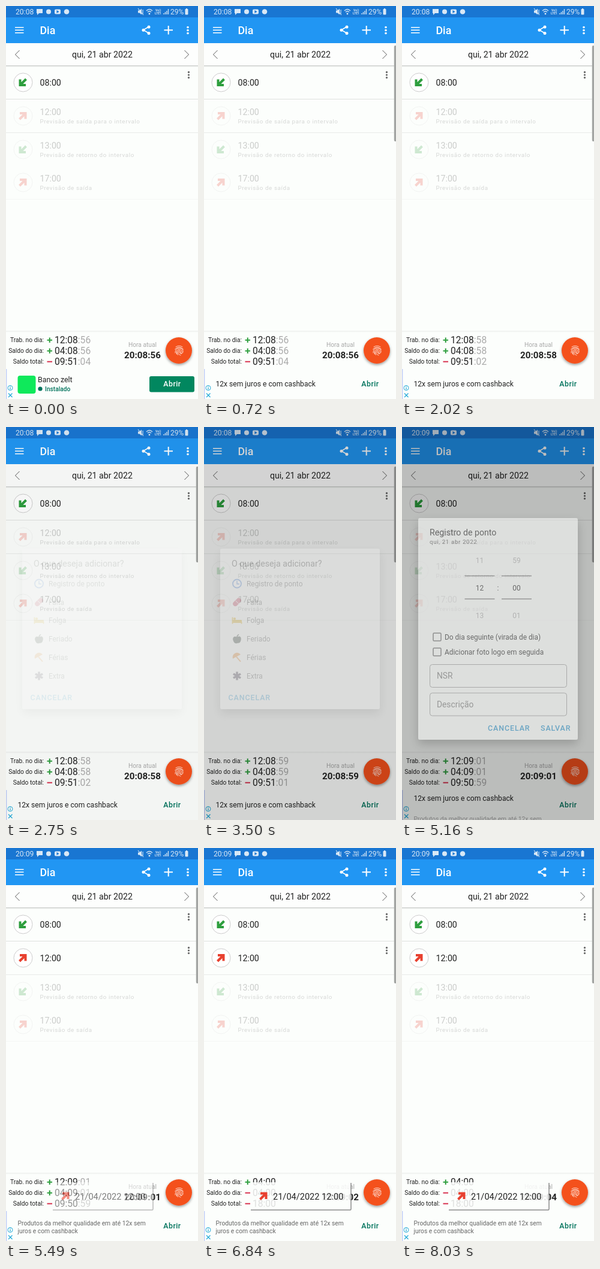
Write an HTML page that moves like this. It is 320 px wide and 656 px high and loops after 8.78 s.

```html
<!DOCTYPE html>
<html lang="pt">
<head>
<meta charset="utf-8">
<style>
html, body { margin: 0; height: 100%; overflow: hidden; background: #fcfefc; }
svg { display: block; width: 320px; height: 656px; font-family: Roboto, sans-serif; fill: #222; }
text { white-space: pre; }
</style>
</head>
<body>
<svg id="stage" viewBox="0 0 320 656"></svg>
<script>
const LOOP = 8780;
const STEPS = [0, 100, 200, 310, 410, 510, 610, 720, 820, 1040, 2020, 2650, 2760, 2870, 2970,
  3500, 3600, 3670, 3730, 4030, 5030, 5160, 5260, 5380, 5490, 5610, 5680, 5750, 5810, 6040,
  6840, 6920, 7000, 7070, 7900, 8030];
const TICKS = [1040, 2020, 2970, 3730, 4030, 6040, 7070, 8030];
const GREEN = '#2e9e3e', RED = '#e8402f', TEAL = '#01735c', BLUE = '#2196f3', LINK = '#2491cb';

// y is the middle of the capitals
const text = (x, y, size, str, attrs = '') =>
  `<text x="${x}" y="${(y + size * .355).toFixed(2)}" font-size="${size}" ${attrs}>${str}</text>`;
const rect = (x, y, w, h, fill, attrs = '') =>
  `<rect x="${x}" y="${y}" width="${w}" height="${h}" fill="${fill}" ${attrs}/>`;
const dot = (x, y, r, fill, attrs = '') => `<circle cx="${x}" cy="${y}" r="${r}" fill="${fill}" ${attrs}/>`;
const line = (d, stroke, w = 1, attrs = '') =>
  `<path d="${d}" fill="none" stroke="${stroke}" stroke-width="${w}" ${attrs}/>`;
const group = (id, body, attrs = '') => `<g id="${id}" ${attrs}>${body}</g>`;
const kebab = (x, y, gap, r, fill) => [-gap, 0, gap].map(d => dot(x, y + d, r, fill)).join('');
const arrow = (x, y, out) =>
  line('M-5-4.500H4.500V5M4-4L-5.500 5.500', out ? RED : GREEN, 4, `transform="translate(${x} ${y}) rotate(${out ? 0 : 180})"`);
const caption = 'letter-spacing=".6" fill="#555"', button = `fill="${LINK}" font-weight="500" letter-spacing=".9"`;

const statusBar = rect(0, 0, 320, 19, '#1976d2') + `<g fill="#d9e8f6">` +
  text(16, 9.5, 12.2, '20:08', 'id="status"') +
  '<path d="M51 5h10v7h-6l-3 3v-3h-1z"/>' + dot(71, 9.5, 4, '#d9e8f6') +
  rect(81, 5.5, 10, 8, '#d9e8f6', 'rx="2"') + '<path d="M84.5 7l4 2.5-4 2.5z" fill="#1976d2"/>' +
  dot(101, 9.5, 4.3, '#d9e8f6') +
  '<path d="M220 7.5h2.5l3.5-3v10l-3.5-3H220z"/>' + line('M220 4l9 11M228 6v7', '#d9e8f6', 1.1) +
  line('M234 8q5-5 10 0M236 10.3q3-3 6 0', '#d9e8f6', 1.3) + dot(239, 13, 1.4, '#d9e8f6') +
  text(249, 7, 5, 'Vo))', 'font-weight="700"') + text(248, 12, 5, 'LTE1', 'font-weight="700"') +
  line('M263 14v-2M265.5 14v-4M268 14v-6M270.5 14V5', '#d9e8f6', 1.3) +
  text(274, 9.5, 12, '29%') + rect(298.5, 5, 5, 9.5, '#d9e8f6', 'rx="1"') + rect(300, 4, 2, 1, '#d9e8f6') + '</g>';

const appBar = rect(0, 19, 320, 43, BLUE) + `<g fill="#fff">` +
  line('M15 35.8h14.5M15 40.3h14.5M15 44.8h14.5', '#fff', 1.6) +
  text(56.5, 41, 17.8, 'Dia', 'font-weight="500"') +
  line('M238 34.5L229 40l9 5.5', '#fff', 1.5) + dot(238, 35, 2.5, '#fff') + dot(229, 40.3, 2.5, '#fff') + dot(238, 45.5, 2.5, '#fff') +
  line('M263.5 40.3h14.5M270.7 33v14.5', '#fff', 2) + kebab(303, 40.5, 5, 1.8, '#fff') + '</g>';

const dateBar = rect(0, 99, 320, 3, 'url(#fade)') + rect(0, 62, 320, 37, '#fdfefd') +
  line('M22.5 74l-7 7 7 7M297.5 74l7 7-7 7', '#444', .9) +
  text(160.5, 81, 14.2, 'qui, 21 abr 2022', 'text-anchor="middle"') + line('M0 99.5H320', '#d0d2d0');

const row = (y, time, out, note) =>
  dot(28.5, y, 15.5, '#fff', 'stroke="#ccc"') + arrow(28, y, out) +
  (note ? text(56.5, y - 6.5, 14.2, time) + text(56.5, y + 9.5, 9.8, note, caption)
        : text(56.5, y + .5, 14.2, time) + kebab(304.5, y - 12.5, 4.6, 1.6, '#666'));
const rows = row(127.5, '08:00', false) +
  group('planned', row(183.5, '12:00', true, 'Previsão de saída para o intervalo')) +
  group('logged', row(183.5, '12:00', true)) +
  `<g opacity=".22">${row(239.5, '13:00', false, 'Previsão de retorno do intervalo')}${row(294.5, '17:00', true, 'Previsão de saída')}</g>` +
  line('M0 155.5H320', '#dfe1df') + line('M0 211.5H320', '#e9ebe9') + line('M0 322.5H320', '#f5f7f5');

const balance = (i, label, negative) => {
  const y = 557.7 + i * 18;
  return text(63, y, 10.25, label, 'text-anchor="end"') +
    line(`M68.5 ${y}h8.5`, negative ? '#d8324f' : GREEN, 2, `id="bar${i}"`) +
    line(`M72.75 ${y - 4.25}v8.5`, GREEN, 2, `id="stem${i}"${negative ? ' opacity="0"' : ''}`) +
    text(81, y, 15.6, `<tspan id="hm${i}"></tspan><tspan id="s${i}" fill="#aaa"></tspan>`);
};
const panel = rect(0, 542, 320, 3, 'url(#fade)', 'opacity=".3"') + rect(0, 545, 320, 61, '#fcfefc') +
  balance(0, 'Trab. no dia:') + balance(1, 'Saldo do dia:') + balance(2, 'Saldo total:', true) +
  text(227.5, 565.5, 10.25, 'Hora atual', 'text-anchor="middle" fill="#aaa"') +
  text(227.5, 582.7, 15.2, '', 'id="clock" text-anchor="middle" font-weight="700"') +
  dot(288, 575, 22, '#f4511e', 'filter="url(#shadow)"') +
  line('M283 569q5.5-3.5 11 0M281.5 573q7-7 14 0M282 579q0-8 6.5-8t6.5 6q0 2.5-2.2 2.5T290.5 577q0-2-2-2t-2 2q0 4.5 4.5 6M284.3 581q-1-8 4.2-7.800t4.3 4M288.5 577q0 3 4 3.5M286.5 582.5q-2-2.5-2-5', '#fff', .8, 'stroke-linecap="round"');

const ad = rect(0, 606, 320, 50, '#fcfefc') + `<g clip-path="url(#adClip)">` +
  group('adIcon', rect(19.5, 617, 30, 30, '#0fe95b', 'rx="4"') +
    text(53, 624, 12.4, 'Banco zelt') +
    dot(57, 639, 3.6, TEAL) + text(65, 639.5, 10.2, 'Instalado', `fill="${TEAL}" font-weight="500"`)) +
  group('adTitle', text(19.5, 631, 12.1, '12x sem juros e com cashback')) +
  group('adBody', text(19.5, 626.5, 10.3, 'Produtos da melhor qualidade em até 12x sem') +
    text(19.5, 639, 10.3, 'juros e com cashback'), 'fill="#666"') + '</g>' +
  rect(239, 618, 75, 26.5, '#01875f', 'id="adButton" rx="3"') +
  ['adOpen', 'adOpenLight'].map((id, i) => text(277, 631, 12.3, 'Abrir',
    `id="${id}" text-anchor="middle" font-weight="500" letter-spacing=".5" fill="${i ? '#fff' : TEAL}"`)).join('') +
  rect(0, 606, 1.3, 50, '#bccbf8') + rect(2, 632, 10, 24, '#fcfefc') +
  dot(7, 637.5, 4, 'none', 'stroke="#1fa9d8"') + line('M7 636.5v3.5M7 634.5v1M4 646.5l6.5 6.5M10.5 646.5l-6.5 6.5', '#1fa9d8', 1.2);

const bannerText = 'text-anchor="middle" fill="#fff" letter-spacing=".22"';
const banner = rect(0, 606, 320, 50, '#1976d2') +
  text(160, 626, 10.67, 'Quer remover os anúncios de forma definitiva? Maiores', bannerText) +
  text(160, 638, 10.67, 'detalhes no menu de "Apoiar o app".', bannerText);

const items = [
  ['Registro de ponto', dot(0, 0, 7, '#fff', 'stroke="#3472d0" stroke-width="1.8"') + line('M0-4.5V.5H4', '#3472d0', 1.4)],
  ['Falta', rect(-8, -4, 16, 8, '#c22f4c', 'rx="4" transform="rotate(-45)"') + line('M-2.5-2.5l5 5', '#fff', 1)],
  ['Folga', line('M-7.5-5.5V5.5M-7.5 3H7.5V5.5', '#d9a400', 1.8) + rect(-7, -1, 15, 4, '#d9a400', 'rx="1"') + dot(-4, -3, 2, '#d9a400')],
  ['Feriado', '<path d="M0-3C-4-6-8-3-6.5 2S-2 8 0 7s5 1 6.5-5S4-6 0-3z" fill="#1d2b20"/>' + line('M0-3q0-3 3-4.5', '#1d2b20', 1.6)],
  ['Férias', '<path d="M-7 2A7.5 7.5 0 0 1 6-5z" fill="#e8801e"/>' + line('M-1-1L6 7', '#e8801e', 1.8)],
  ['Extra', [0, 60, 120].map(a => line('M0-7V7', '#2b2036', 3.6, `transform="rotate(${a})"`)).join('')]
];
const dialogBox = (y, h) => rect(27, y, 266, h, '#fdfefd', 'rx="3" filter="url(#deepShadow)"');
const addDialog = dialogBox(203, 268) +
  text(46, 227.5, 14.2, 'O que deseja adicionar?') +
  items.map(([label, icon], i) => {
    const y = 261.5 + i * 30.8;
    return `<g transform="translate(55 ${y})">${icon}</g>` + text(71, y, 11.9, label, 'fill="#444"');
  }).join('') + text(40.5, 452, 12.44, 'CANCELAR', button);

const spinner = (x, values) => values.map((v, i) =>
  text(x, 222.5 + i * 46.2, 12, v, `text-anchor="middle" fill="${i === 1 ? '#222' : '#aaa'}"`)).join('') +
  line(`M${x - 25} 248.5h50M${x - 25} 287h50`, '#777', 1.3);
const check = (y, label) => rect(52, y - 6.5, 13, 13, 'none', 'rx="1.5" stroke="#666" stroke-width="1.5"') + text(71, y, 11.9, label);
const field = (y, label) => rect(46.5, y, 228, 38, 'none', 'rx="4" stroke="#999"') + text(58, y + 19, 13.8, label, 'fill="#777"');
const punchDialog = dialogBox(152, 370) +
  text(46, 175.5, 14.2, 'Registro de ponto') + text(46, 191.5, 9.8, 'qui, 21 abr 2022', caption) +
  spinner(129.5, ['11', '12', '13']) + text(158.5, 268.5, 12, ':') + spinner(191, ['59', '00', '01']) +
  check(350.5, 'Do dia seguinte (virada de dia)') + check(375.5, 'Adicionar foto logo em seguida') +
  field(396.5, 'NSR') + field(444, 'Descrição') +
  text(143, 503, 12.44, 'CANCELAR', button) + text(231, 503, 12.44, 'SALVAR', button);

const toast = rect(77, 558, 167.5, 46, '#fdfefd', 'rx="2" fill-opacity=".86"') +
  line('M78 604.3H243.5Q245 604.3 245 602.5V559', '#8b8b8b', 1.5) +
  arrow(99, 581, true) + text(115, 581.5, 14.57, '21/04/2022 12:00');

const shadow = (id, dy, blur, opacity) =>
  `<filter id="${id}" x="-20%" y="-20%" width="140%" height="140%"><feDropShadow dx="0" dy="${dy}" stdDeviation="${blur}" flood-opacity="${opacity}"/></filter>`;
stage.innerHTML = `<defs>
  <linearGradient id="fade" x2="0" y2="1"><stop stop-color="#000" stop-opacity=".2"/><stop offset="1" stop-opacity="0"/></linearGradient>
  ${shadow('shadow', 2, 2, .4)}${shadow('deepShadow', 7, 8, .35)}
  <clipPath id="adClip"><rect y="606" width="238" height="50"/></clipPath></defs>` +
  rect(0, 0, 320, 656, '#fcfefc') + rows + dateBar + appBar + statusBar + panel + ad + group('banner', banner) +
  rect(316.8, 66, 4, 160, '#a3a5a3', 'id="handle" rx="2"') + rect(0, 0, 320, 656, '#000', 'id="scrim"') +
  group('addDialog', addDialog) + group('punchDialog', punchDialog) + group('toast', toast);

const el = id => document.getElementById(id);
const show = (id, alpha) => el(id).setAttribute('opacity', +alpha);
const shift = (id, y) => el(id).setAttribute('transform', `translate(0 ${y})`);
const ramp = (t, a, b) => Math.min(1, Math.max(0, (t - a) / (b - a)));
const ease = p => p * p * (3 - 2 * p);
const between = (t, a, b, c, d) => ramp(t, a, b) * (1 - ramp(t, c, d));
const hms = s => [s / 3600, s / 60 % 60, s % 60].map(v => String(Math.floor(v)).padStart(2, '0')).join(':');

function draw(now) {
  const t = STEPS.findLast(s => s <= now % LOOP);
  const n = TICKS.filter(s => s <= t).length;
  const logged = t >= 5380, settled = t >= 6040;

  const values = settled ? ['04:00', '04:00', '18:00'] : [hms(43736 + n), hms(14936 + n), hms(35464 - n)];
  values.forEach((v, i) => {
    el('hm' + i).textContent = v.slice(0, 5);
    el('s' + i).textContent = v.slice(5);
  });
  el('bar1').setAttribute('stroke', settled ? '#d8324f' : GREEN);
  show('stem1', !settled);
  const clock = hms(72536 + n);
  el('clock').textContent = clock;
  el('status').textContent = clock.slice(0, 5);

  show('planned', logged ? 0 : .22);
  show('logged', logged);
  show('handle', ramp(t, 200, 600));

  const first = ease(ramp(t, 60, 620)), second = ease(ramp(t, 5000, 5460));
  shift('adIcon', -50 * first);
  shift('adTitle', 50 * (1 - first) - 39 * second);
  shift('adBody', 39 * (1 - second));
  show('adTitle', first * (1 - ramp(second, .6, 1)));
  show('adBody', second > 0 ? .4 + .6 * second : 0);
  show('adButton', 1 - first);
  show('adOpen', first);
  show('adOpenLight', 1 - first);
  show('banner', t >= 3600 && t < 5030);

  show('scrim', .32 * Math.max(between(t, 2620, 2900, 3420, 3590), between(t, 3560, 3720, 5130, 5290)));
  show('addDialog', between(t, 2620, 2900, 3400, 3528));
  show('punchDialog', between(t, 3560, 3720, 5110, 5215));
  show('toast', ramp(t, 5330, 5600));
}

const start = performance.now();
(function frame() {
  draw(performance.now() - start);
  requestAnimationFrame(frame);
})();
</script>
</body>
</html>
```
